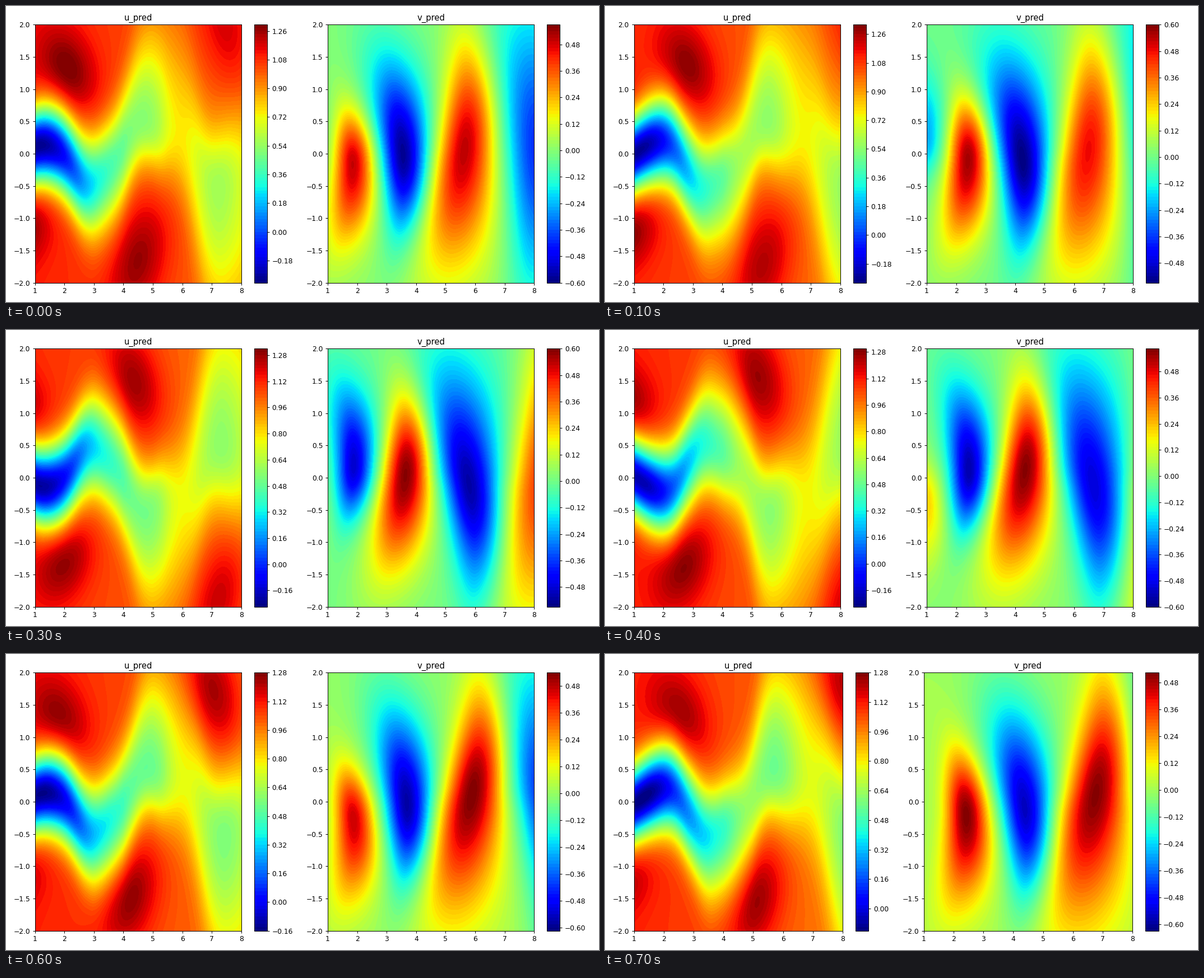
Animation of 1058 by 529 pixels, one loop 0.8 s. Source, as a matplotlib script:

```python
import numpy as np
import matplotlib.pyplot as plt
from matplotlib.animation import FuncAnimation

W, H = 1058, 529
FRAMES, STEP_MS = 8, 100
TOP, BOTTOM, LEFT, RIGHT = 33.3, 494.7, 51.5, 1034.3

X, Y = np.meshgrid(np.linspace(1, 8, 211), np.linspace(-2, 2, 161))


def drift(tau):
    """Position of a cell that has been carried along for tau steps."""
    return 1.85 + .52 * tau + .027 * tau ** 2


def age(x):
    """Inverse of drift."""
    return (np.sqrt(.52 ** 2 + .108 * (x - 1.85)) - .52) / .054


def bump(r):
    return np.exp(-.5 * r ** 2)


def key_level(k, keys, step):
    """Range limit from four key times, snapped to a whole level."""
    return step * np.round(np.interp(k, [0, 2, 4, 7], keys) / step)


def cross_flow(k):
    """Alternating cells that grow, lean and spread as they travel."""
    v = np.zeros_like(X)
    for n in range(-2, 4):
        sign = (-1) ** n
        xc = drift(k + 2.9 * n - .04 * n ** 2)
        if xc < .4:
            continue
        amp = .62 * np.tanh((xc - .4) / 1.3) - .025 * max(xc - 3, 0)
        amp *= sign * (1 - .02 * n ** 2)

        d = sign * Y - np.clip(.133 * xc - .4, -.2, .2) + .03 * n ** 2
        tall = np.where(d > 0, .56 + .155 * (xc - 1.8), .85 + .11 * (xc - 1.8))
        tilt = np.clip(.11 * (xc - 1.85), -.05, .42) - .04 * n ** 2
        bend = max(.2 - .035 * (xc - 1.85), .05)
        r = X - xc - 1.2 * tilt * np.tanh(d / 1.2) + bend * d ** 2
        wide = (.46 + .06 * (xc - 1.85)) * np.where(r < 0, .95, 1.07)
        wide = wide * np.where(d < 0, 1 - .25 * d, np.maximum(1 - .1 * d, .75))
        v += amp * bump(r / wide) * bump(d / tall)
    return v


def wake(k):
    """Meandering low-speed wake in a nearly uniform stream."""
    theta = np.pi * (age(X) - k - 1.65) / 2.9
    far = np.clip((X - 2.8) / 2.2, 0, 1)
    swing = -np.cos(theta - .6 * far * np.sin(theta) ** 2)
    mid = swing * (.12 + .43 / (1 + np.exp((2.35 - X) / .33)))

    s = X - 1
    deficit = .38 + 1.02 / (1 + (s / 1.8) ** 2.5)
    deficit -= .027 * k * np.clip(1 - s / 2.5, 0, 1)
    deficit *= 1 - .42 * np.clip((X - 4) / 1.5, 0, 1) * np.sin(theta) ** 2
    width = .42 + .68 * (s / 7) ** 1.4
    width *= 1 + .3 * far * swing * np.tanh(2 * (Y - mid))
    return 1.1 - .018 * s - deficit * bump((Y - mid) / width)


def stream_flow(k):
    """Wake plus fast patches that pass along either side of it."""
    u = wake(k)
    for n in range(-3, 3):
        tau = k + 3.2 * n
        xc = 2.1 + .68 * tau + .025 * tau ** 2
        xc = max(xc, .36 + .6 * xc)
        out = .15 * max(n, 0)
        d = (-1) ** n * Y - (1.25 + .08 * (xc - 1.5) + out)
        tall = .44 + .043 * (xc - 1.5) + .5 * out
        amp = .24 - .012 * n ** 2
        u += amp * bump((X - xc + .4 * d) / .66) * bump(d / tall)
    return u


def add_axes(x, width):
    return fig.add_axes([x / W, 1 - BOTTOM / H, width / W, (BOTTOM - TOP) / H])


def panel(x, span, title, field, low, high, step):
    ax = add_axes(x, .8 * span)
    count = int(round((high - low) / step))
    levels = np.round(low + step * np.arange(count + 1), 3) + 0.0
    z = np.clip(field, low + 1e-6, high - 1e-6)
    filled = ax.contourf(X, Y, z, levels=levels, cmap="jet")
    ax.set_title(title)
    ax.set_xticks(range(1, 9))
    ax.set_yticks(np.linspace(-2, 2, 9))
    ax.set_xlim(1, 8)
    ax.set_ylim(-2, 2)

    every = -(-len(levels) // 10)
    ticks = [q for q in levels if int(round(q / step)) % every == 0]
    bar = add_axes(x + .85 * span, (BOTTOM - TOP) / 20)
    fig.colorbar(filled, cax=bar, ticks=ticks)


def draw(k):
    fig.clear()
    u_low = key_level(k, [-.32, -.28, -.252, -.12], .02)
    u_high = key_level(k, [1.30, 1.32, 1.30, 1.28], .02)
    v_low = key_level(k, [-.600, -.555, -.600, -.630], .015)
    v_high = key_level(k, [.570, .615, .585, .525], .015)
    # Narrower bar labels leave the panels more room
    span = 465.6 if u_low > -.15 else 460.3
    panel(LEFT, span, "u_pred", stream_flow(k), u_low, u_high, .02)
    panel(RIGHT - span, span, "v_pred", cross_flow(k), v_low, v_high, .015)
    return []


fig = plt.figure(figsize=(12, 6), dpi=W / 12, facecolor="white")
anim = FuncAnimation(fig, draw, frames=FRAMES, init_func=lambda: [],
                     interval=STEP_MS, repeat=True, repeat_delay=0, blit=False)
plt.show()
```
